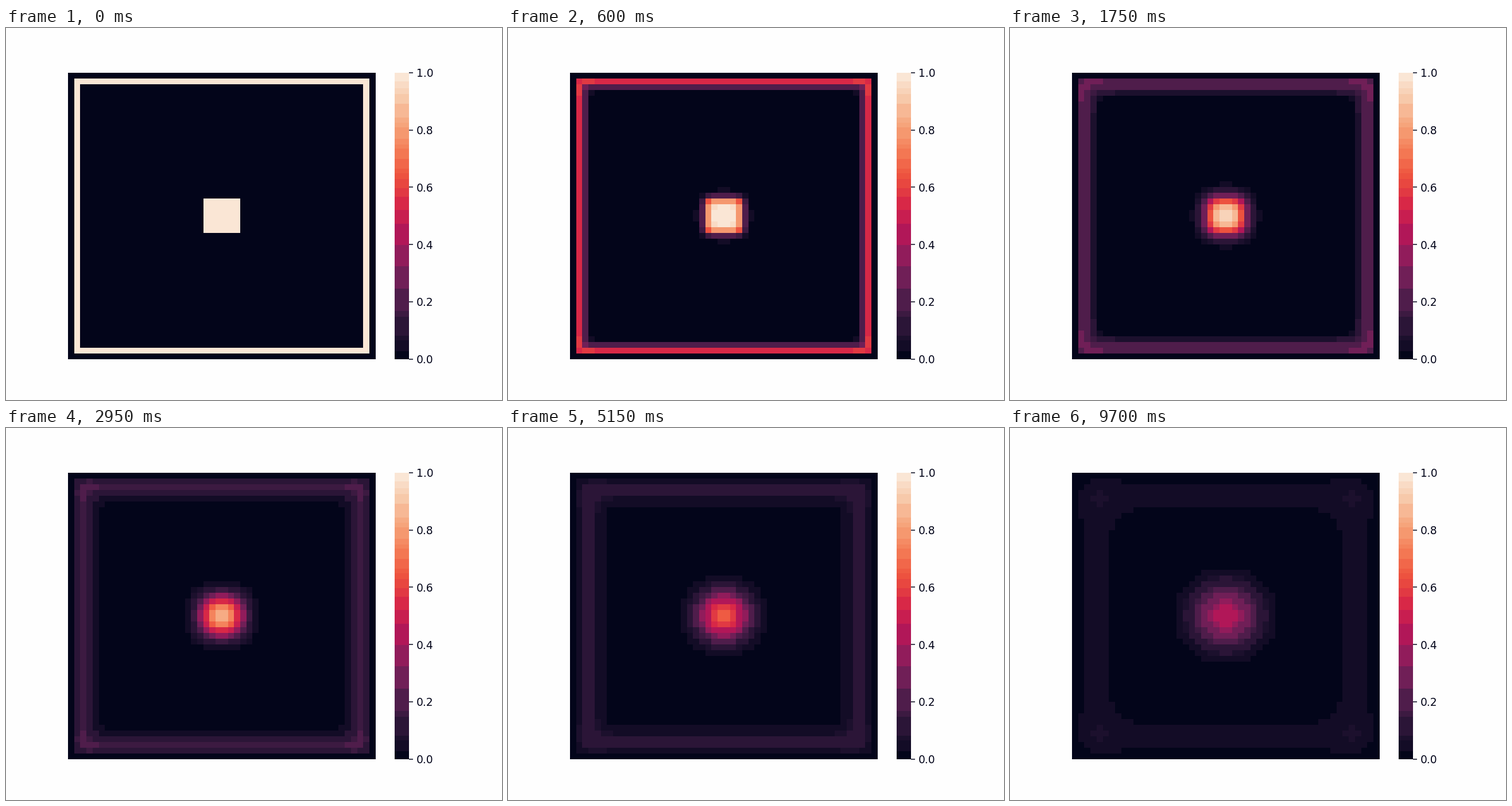
Animation of 864 by 648 pixels, one loop 10000 ms. Source, as a matplotlib script:

```python
import numpy as np
import matplotlib.pyplot as plt
from matplotlib.animation import FuncAnimation
from matplotlib.colors import BoundaryNorm, LinearSegmentedColormap, ListedColormap

DPI = 135
SIZE = 50
FRAMES = 200
RATE = 0.025  # diffusion number per frame
INK = "#03051a"

ANCHORS = ["#03051A", "#221331", "#451C47", "#6A1F56", "#921C5B", "#B91657",
           "#D92847", "#ED513E", "#F47C56", "#F6A47B", "#F7C9AA", "#FAEBDD"]
STEPS = [0, 7, 17, 21, 38, 43, 63, 83, 102, 121, 133, 145, 153, 161, 166, 170,
         179, 188, 192, 197, 207, 211, 216, 228, 237, 242, 248, 256]


def banded_colors():
    """Colour map and norm with one flat colour per value band."""
    edges = np.array(STEPS) / 256
    mids = (edges[:-1] + edges[1:]) / 2
    mids[0] = 0
    smooth = LinearSegmentedColormap.from_list("heat", ANCHORS, N=1024)
    cmap = ListedColormap(smooth(mids))
    cmap.set_over(cmap.colors[-1])
    return edges, mids, cmap, BoundaryNorm(edges, cmap.N)


def start_field():
    u = np.zeros((SIZE, SIZE))
    u[1:-1, 1:-1] = 1
    u[2:-2, 2:-2] = 0
    u[22:28, 22:28] = 1
    return u


def diffuse(u):
    """One explicit step; the outer border stays cold."""
    new = u.copy()
    new[1:-1, 1:-1] += RATE * (u[2:, 1:-1] + u[:-2, 1:-1] + u[1:-1, 2:]
                               + u[1:-1, :-2] - 4 * u[1:-1, 1:-1])
    return new


fields = [start_field()]
while len(fields) < FRAMES:
    fields.append(diffuse(fields[-1]))

edges, mids, cmap, norm = banded_colors()
fig = plt.figure(figsize=(6.4, 4.8), dpi=DPI, facecolor="#fefefe")

ax = fig.add_axes([0.125, 0.11, 0.62, 0.77])
ax.set_axis_off()
mesh = ax.pcolormesh(fields[0], cmap=cmap, norm=norm)
ax.set(xlim=(0, SIZE), ylim=(SIZE, 0))

bar = fig.add_axes([0.78375, 0.11, 0.028875, 0.77])
bar.pcolormesh([0, 1], edges, mids[:, None], cmap=cmap, norm=norm)
bar.set(xlim=(0, 1), ylim=(0, 1), xticks=[], yticks=np.linspace(0, 1, 6))
bar.yaxis.tick_right()
bar.tick_params(axis="y", colors=INK)
for spine in bar.spines.values():
    spine.set_visible(False)


def update(i):
    mesh.set_array(fields[i])
    return [mesh]


anim = FuncAnimation(fig, update, frames=FRAMES, interval=50,
                     repeat=True, repeat_delay=0, blit=False)
plt.show()
```
